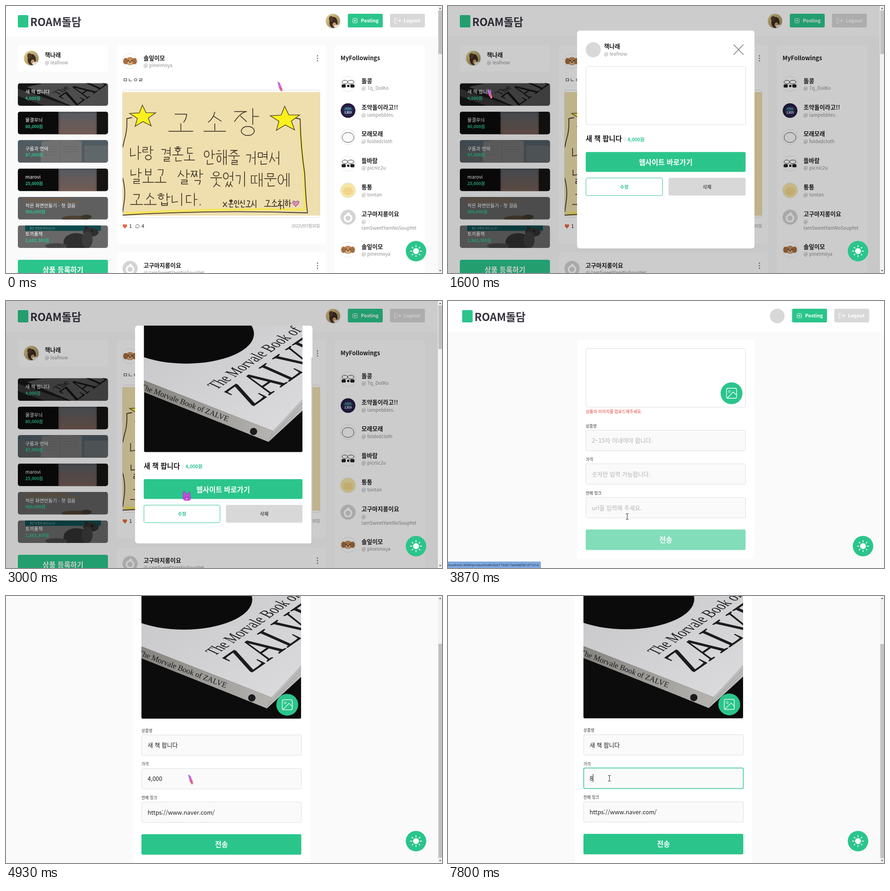
An HTML page that plays this animation: 956x586 px, repeating every 8 s.

```html
<!DOCTYPE html>
<html lang="ko">
<head>
<meta charset="utf-8">
<style>
html, body { margin: 0; width: 100%; height: 100%; overflow: hidden; background: #fafafa; }
svg { display: block; }
text { white-space: pre; }
</style>
</head>
<body>
<svg id="stage" width="956" height="586" viewBox="0 0 956 586"
  font-family="'Noto Sans CJK KR','Noto Sans CJK JP','Noto Sans',sans-serif"></svg>
<script>
const LOOP = 8000;
const GREEN = '#2bc58b', GREY = '#d8d8d8', INK = '#1d1d1f', MUTED = '#8f8f8f', RED = '#e03c31';
const SERIF = "'Liberation Serif',serif";

const text = (x, y, s, size, fill = INK, weight = 400, extra = '') =>
  `<text x="${x}" y="${y}" font-size="${size}" fill="${fill}" font-weight="${weight}" ${extra}>${s}</text>`;
const centred = (x, y, s, size, fill, weight = 700) => text(x, y, s, size, fill, weight, 'text-anchor="middle"');
const rect = (x, y, w, h, fill, r = 0, extra = '') =>
  `<rect x="${x}" y="${y}" width="${w}" height="${h}" rx="${r}" fill="${fill}" ${extra}/>`;
const circle = (x, y, r, fill, extra = '') => `<circle cx="${x}" cy="${y}" r="${r}" fill="${fill}" ${extra}/>`;
const ellipse = (x, y, rx, ry, fill, extra = '') =>
  `<ellipse cx="${x}" cy="${y}" rx="${rx}" ry="${ry}" fill="${fill}" ${extra}/>`;
const path = (d, fill = 'none', stroke = 'none', width = 1) =>
  `<path d="${d}" fill="${fill}" stroke="${stroke}" stroke-width="${width}" stroke-linecap="round" stroke-linejoin="round"/>`;
const at = (x, y, body, extra = '') => `<g transform="translate(${x} ${y})" ${extra}>${body}</g>`;
const group = (id, body, extra = '') => `<g id="${id}" ${extra}>${body}</g>`;
const outline = colour => `stroke="${colour}"`;

const defs = `<defs>
  <linearGradient id="sky" x2="0" y2="1"><stop stop-color="#4b5158"/><stop offset="1" stop-color="#6b5148"/></linearGradient>
  <linearGradient id="fur" x2="1" y2="1"><stop stop-color="#e3d58e"/><stop offset=".5" stop-color="#b9a46c"/><stop offset="1" stop-color="#8c8f5c"/></linearGradient>
  <linearGradient id="cover" x2="1" y2="1"><stop stop-color="#c6c6c9"/><stop offset="1" stop-color="#dcdcde"/></linearGradient>
  <linearGradient id="spine"><stop stop-color="#85847f"/><stop offset="1" stop-color="#b5b4b1"/></linearGradient>
  <radialGradient id="night"><stop stop-color="#2a5673"/><stop offset=".6" stop-color="#2c2150"/><stop offset="1" stop-color="#1b1430"/></radialGradient>
  <linearGradient id="pen" x2="0" y2="1"><stop stop-color="#a65cf0"/><stop offset=".55" stop-color="#dd62d8"/><stop offset="1" stop-color="#f0586a"/></linearGradient>
  <clipPath id="cardClip"><rect width="197.5" height="49.5" rx="5"/></clipPath>
  <clipPath id="faceClip"><circle r="16.2"/></clipPath>
  <clipPath id="photoClip"><rect width="350" height="283.5" rx="3"/></clipPath>
  <clipPath id="letterClip"><rect x="256" y="189" width="432.5" height="271"/></clipPath>
  <clipPath id="modalClip"><rect x="283" y="54" width="389" height="478" rx="6"/></clipPath>
</defs>`;

const faces = {
  me: circle(0, 0, 17, 'url(#fur)') + ellipse(1, 3, 9, 12, '#3b2a20') + ellipse(-4, -5, 5, 6, '#54392a') +
    ellipse(3, 8, 4, 5, '#c59a6c') + ellipse(9, 12, 7, 4, '#e6ded0'),
  puppy: circle(0, 0, 17, '#fff') + ellipse(0, 0, 10, 9, '#c08a58') + ellipse(-10, 0, 5, 7, '#a56d40') +
    ellipse(10, 0, 5, 7, '#a56d40') + ellipse(0, 4, 5, 4, '#d9ae82') + circle(-4, -1, 1.2, '#222') +
    circle(4, -1, 1.2, '#222') + ellipse(0, 2, 1.8, 1.3, '#222'),
  mono: circle(0, 0, 17, '#fff') + ellipse(-7, -4, 6, 4, '#fff', outline('#222')) + ellipse(6, -4, 7, 4, '#fff', outline('#222')) +
    rect(-14, 1, 9, 7, '#222', 2) + rect(-2, 2, 5, 5, '#222', 1) + rect(5, 1, 9, 7, '#222', 2),
  night: circle(0, 0, 17, 'url(#night)') + centred(0, 6, '2,819', 6, '#fff') + rect(-7, -6, 14, 1.5, '#58b4a8') + rect(-9, -3, 18, 1.2, '#4a8f9c'),
  pale: circle(0, 0, 17, '#fff') + ellipse(0, 1, 13, 11, '#fcfcfc', outline('#444')),
  cream: circle(0, 0, 17, '#f5e6a6') + ellipse(0, 2, 11, 9, '#f3d58a'),
  blank: circle(0, 0, 17, '#d3d3d3') + circle(0, 2, 7.5, 'none', 'stroke="#fff" stroke-width="4"') + ellipse(1, -8, 3, 2.5, '#fff'),
};
const avatar = (x, y, kind, r = 16.5) =>
  at(x, y, `<g clip-path="url(#faceClip)">${faces[kind]}</g>` + circle(0, 0, r, 'none', outline('#e3e3e3')));
const person = (x, y, kind, name, handle, dx = 29.5) =>
  avatar(x, y, kind) + text(x + dx, y - 2.5, name, 12.8, INK, 700) + text(x + dx, y + 13, handle, 10.3, MUTED);

const header = rect(-10, 0, 980, 67, '#fff') + rect(26, 20, 23, 27, GREEN, 2) +
  text(53, 44, 'ROAM돌담', 23.5, '#34343f', 900) +
  circle(717, 33, 16, GREY) + group('headerFace', avatar(717, 33, 'me', 16)) +
  rect(749.5, 17, 76.5, 30, GREEN, 3) + rect(760.5, 27.5, 9.5, 9.5, 'none', 2, outline('#fff')) +
  path('M765.2 30v4.6M763 32.3h4.6', 'none', '#fff') + text(778, 36, 'Posting', 10.6, '#fff', 700) +
  rect(842, 17, 76.5, 30, GREY, 3) +
  path('M857 27h-4.5v10.5h4.5M857 32.2h8M862.5 29.5l2.8 2.7l-2.8 2.7', 'none', '#fff', 1.2) +
  text(872, 36, 'Logout', 10.6, '#fff', 700);

const blueBook = rect(0, 0, 198, 50, '#0b0b0b') + rect(89, 0, 84, 50, 'url(#sky)') + rect(93, 4, 77, 46, '#fff', 0, 'opacity=".06"') + rect(173, 0, 25, 50, '#161412');
const books = [
  ['새 책 팝니다', '4,000원', rect(0, 0, 198, 50, '#161616') + path('M58 0H198V50H118L20 8Z', '#4d4d4d') +
    path('M0 12L112 50H60L0 28Z', '#353535') +
    `<text transform="matrix(.84 -.54 .9 .43 88 27)" font-size="20" font-family="${SERIF}" fill="#111">The</text>` +
    `<text transform="matrix(.82 -.57 1.44 .64 128 50)" font-size="44" font-family="${SERIF}" fill="#111">ZALVE</text>`],
  ['물결무늬', '80,000원', blueBook],
  ['구름과 언덕', '87,000원', rect(0, 0, 198, 50, '#555b5e') + rect(0, 0, 198, 14, '#4f5a61') + path('M52 3L92 0L140 2V50H50Z', '#717171') +
    path('M92 2V50M58 14h28M58 20h28M58 26h28M58 32h28M98 14h34M98 20h34M98 26h34', 'none', '#646464') + rect(146, 12, 52, 38, '#60676a')],
  ['marovi', '25,000원', blueBook],
  ['작은 화면만들기 - 첫 걸음', '900,000원', rect(0, 0, 198, 50, '#5f5f5f') + text(16, 8, '화면만들기의 기본 개념과 동작 원리', 6.2, '#9a5a1e') +
    rect(16, 11, 122, 1, '#8a6238') + ellipse(126, 47, 30, 6, '#4b4030') + ellipse(150, 44, 12, 5, '#3c3529')],
  ['토끼풀책', '1,882,300원', rect(0, 0, 198, 50, '#686868') + rect(16, 0, 166, 12, '#0d4a4c') + text(26, 8, '풀은 이렇게 자라나는가?', 5.5, '#8fa5a5') +
    ellipse(128, 37, 28, 20, '#2f2f2f') + ellipse(160, 15, 17, 10, '#303030') + ellipse(152, 32, 12, 18, '#3c3c3c') +
    circle(150, 6, 4, '#2a2a2a') + circle(163, 12, 1.8, '#0a0a0a') + ellipse(84, 45, 24, 6, '#444')],
];
const bookCard = ([title, price, art], i) => at(26, 169.5 + i * 62.4,
  `<g clip-path="url(#cardClip)">${art}</g>` + text(16.5, 22.5, title, 10.3, '#fff') + text(16.5, 36, price, 9.1, GREEN, 700));

const star = (cx, cy, r) => {
  const points = Array.from({ length: 10 }, (_, i) => {
    const a = i * Math.PI / 5 - 1.6, d = i % 2 ? r * .42 : r;
    return `${(cx + d * Math.cos(a)).toFixed(1)},${(cy + d * .85 * Math.sin(a)).toFixed(1)}`;
  });
  return `<polygon points="${points.join(' ')}" fill="#fbf01c" stroke="#55482a" stroke-width="1.5"/>`;
};

// Pen-drawn Hangul: each letter is a stroke in a 10 x 10 box, combined by syllable.
const BROWN = '#41352a';
const INITIALS = 'ㄱㄲㄴㄷㄸㄹㅁㅂㅃㅅㅆㅇㅈㅉㅊㅋㅌㅍㅎ';
const VOWELS = 'ㅏㅐㅑㅒㅓㅔㅕㅖㅗㅘㅙㅚㅛㅜㅝㅞㅟㅠㅡㅢㅣ';
const FINALS = ' ㄱㄲㄳㄴㄵㄶㄷㄹㄺㄻㄼㄽㄾㄿㅀㅁㅂㅄㅅㅆㅇㅈㅊㅋㅌㅍㅎ';
const STROKES = {
  ㄱ: 'M1 2H9Q9 6 7 10', ㄴ: 'M1 1V9L10 8', ㄷ: 'M9 1H2V9H10', ㄸ: 'M4 1H0V9H4M10 1H6V9H10', ㄹ: 'M1 1H9V5H1V9H10',
  ㅁ: 'M1 1H9V9H1Z', ㅂ: 'M1 1V9H9V1M1 5H9', ㅅ: 'M5 0Q4 6 0 10M4 4L10 9', ㅆ: 'M3 0L0 10M2 4L5 10M8 0L5 10M7 4L10 10',
  ㅇ: 'M5 0A4.5 5 0 1 0 5.1 0', ㅈ: 'M0 1H10Q5 2 0 10M5 5L10 10', ㅉ: 'M0 1H4L0 10M3 5L5 10M6 1H10L6 10M9 5L10 10',
  ㅊ: 'M4 -1H6M0 2H10Q5 3 0 10M5 6L10 10', ㅎ: 'M3 -1H7M0 2H10M5 4A3.5 3 0 1 0 5.1 4',
  ㅏ: 'M4 0V10M4 5H10', ㅐ: 'M2 0V10M8 0V10M2 5H8', ㅓ: 'M7 0V10M0 5H7', ㅔ: 'M4 0V10M9 0V10M-2 5H4', ㅕ: 'M7 0V10M-1 4H7M-1 7H7',
  ㅣ: 'M6 0V10', ㅟ: 'M-15 8H3M-6 8V13M7 0V12', ㅗ: 'M5 0V7M0 8H10', ㅜ: 'M0 3H10M5 3V10', x: 'M1 3L8 9M8 3L1 9', '.': 'M1 9V9.5',
};
const pen = (letter, x, y, w, h) =>
  `<path transform="translate(${x} ${y}) scale(${w / 10} ${h / 10})" d="${STROKES[letter]}" vector-effect="non-scaling-stroke"/>`;
function syllable(ch) {
  const code = ch.charCodeAt(0) - 0xAC00;
  if (code < 0) return pen(ch, 0, 0, 10, 10);
  const vowel = VOWELS[Math.floor(code % 588 / 28)], final = FINALS[code % 28].trim();
  const initial = INITIALS[Math.floor(code / 588)], h = final ? 6 : 10;
  const top = 'ㅗㅜ'.includes(vowel)
    ? pen(initial, 2, 0, 6, h * .48) + pen(vowel, 0, h * .55, 10, h * .45)
    : pen(initial, 0, h * .12, 5, h * .7) + pen(vowel, 6, 0, 4, h);
  return top + (final && pen(final, 2.5, 6.8, 6, 3.4));
}
const handwriting = ([x, y, pitch, h, s]) => [...s].map((ch, i) =>
  `<g transform="translate(${x + i * pitch} ${y}) scale(${pitch * .088} ${h / 10})">${syllable(ch)}</g>`).join('');
const notes = [
  [357, 233, 60, 46, '고'], [434, 233, 54, 46, '소'], [501, 225, 60, 58, '장'],
  [272, 307, 27, 30, '나랑'], [340, 310, 25.5, 31, '결혼도'], [434, 316, 27, 32, '안해줄'], [526, 319, 26, 29, '거면서'],
  [273, 356, 27, 34, '날보고'], [377, 359, 29, 32, '살짝'], [449, 364, 27, 32, '웃었기'], [538, 367, 29, 29, '때문에'],
  [273, 411, 30, 27, '고소합니다.'], [475, 426, 12.7, 16, 'x혼인신고시'], [567, 425, 15, 16, '고소취하'],
];
const letter = `<g clip-path="url(#letterClip)">` + rect(256, 189, 433, 271, '#efdfae') +
  path('M262 455Q450 444 655 447Q655 350 643 262', 'none', '#f4e55c', 5) +
  path('M276 245L265 247Q266 275 260 292L256 310M256 378Q263 405 259 430L256 452M634 246L645 248Q646 310 655 368Q657 420 661 454Q450 447 256 459', 'none', BROWN, 1.8) +
  star(300, 243, 30) + star(612, 249, 34) +
  `<g fill="none" stroke="${BROWN}" stroke-width="1.7" stroke-linecap="round" stroke-linejoin="round">${notes.map(handwriting).join('')}</g>` +
  path('M635 440Q625 432 630 428Q634 427 635 431Q638 426 642 429Q644 434 635 440Z', '#dc8fc0', '#71405f') + '</g>';

const dots = y => [-5.5, 0, 5.5].map(d => circle(683, y + d, 1.4, '#777')).join('');
const post = rect(243, 85, 458.5, 436.5, '#fff', 5) + person(272, 121, 'puppy', '솔잎이모', '@ pineimoya') + dots(115) +
  text(256, 167, 'ㅁㄴㅇㄹ', 12.2) + rect(255.5, 184.5, 433, 279.5, '#fff', 5, outline('#dcdcdc')) + letter +
  path('M260.8 488.5L256.5 484Q255 480 258 478.8Q260 478.5 260.8 480.5Q261.8 478.5 264 479Q266.5 480.5 264.8 484Z', '#e8663c') +
  text(270, 487, '1', 11) + path('M288.5 479.5a4 3.8 0 1 1 -2 7.1l-2 .8l.6-2a4 3.8 0 0 1 3.4-5.9Z', 'none', '#555') +
  text(297, 487, '4', 11) + text(688.5, 485.5, '2022년07월30일', 8.7, MUTED, 400, 'text-anchor="end"');
const nextPost = rect(243, 541, 458.5, 60, '#fff', 5) + person(272, 576, 'blank', '고구마지롱이요', '@ IamSweetYamNoSoupYet') + dots(570);

const friends = [
  [171, 'mono', '돌콩', '@ 7q_DolKo'], [229.5, 'night', '조약돌이라고!!', '@ iampebbles.'],
  [287.5, 'pale', '모래모래', '@ foldedcloth'], [346, 'mono', '들바람', '@ picnic2u'],
  [404.5, 'cream', '통통', '@ tontan'], [463.5, 'blank', '고구마지롱이요', '@'], [535, 'puppy', '솔잎이모', '@ pineimoya'],
];
const home = rect(26, 85, 197.5, 59, '#fff', 5) + person(55.5, 114.5, 'me', '책나래', '@ leafnow') +
  books.map(bookCard).join('') + rect(26, 557, 197.5, 45, GREEN, 4) + centred(125, 584.5, '상품 등록하기', 15.4, '#fff') +
  post + nextPost + rect(721, 85, 197.5, 520, '#fff', 5) + text(733.5, 118.5, 'MyFollowings', 12.8, INK, 700) +
  friends.map(([y, ...who]) => person(750, y, ...who)).join('') + text(779.5, 490.5, 'IamSweetYamNoSoupYet', 10.3, MUTED);

const photo = `<g clip-path="url(#photoClip)">` + rect(0, 0, 350, 284, '#0c0c0d') +
  path('M0 0H350V168L285 237L0 125Z', 'url(#cover)') + path('M285 237L350 166V192L275 261Z', '#bcbcbc') +
  path('M282 247L350 176M279 253L350 184', 'none', '#8d8d8d') +
  path('M0 125L285 237L275 261L0 151Z', 'url(#spine)') + ellipse(93, 22, 150, 66, '#0b0b0c') +
  `<g font-family="${SERIF}" fill="#1b1b1d">` +
  `<text transform="matrix(.82 -.57 1.3 .6 161 146)" font-size="26.5">The Morvale Book of</text>` +
  `<text transform="matrix(.82 -.57 1.44 .64 240 184)" font-size="72">ZALVE</text>` +
  `<text transform="translate(-8 143) rotate(20.8)" font-size="17">The Morvale Book of ZALVE</text></g>` +
  circle(242, 238, 8, '#1b1b1d') + '</g>';

function modal(loaded) {
  const w = loaded ? 348 : 350.5, half = (w - 12.5) / 2, dy = loaded ? 152.5 : 0, right = 302 + half + 12.5;
  return (loaded ? avatar(318.5, 96, 'me') : circle(318.5, 96, 16.5, GREY)) +
    text(342, 93, '책나래', 12.8, INK, 700) + text(342, 108.5, '@ leafnow', 10.3, MUTED) +
    path('M626.5 85L647.5 106.5M647.5 85L626.5 106.5', 'none', '#777', 1.5) +
    (loaded ? at(302.5, 132, `<g transform="scale(.993)">${photo}</g>`) : rect(302.5, 132.5, 350, 128, '#fff', 3, outline('#dedede'))) +
    at(0, dy, text(302, 297, '새 책 팝니다', 15.4, INK, 700) + rect(387.5, 288, 1, 9, '#ccc') +
      text(393.5, 296.5, '4,000원', 10.3, GREEN, 700) +
      rect(302, 320.5, w, 43.5, GREEN, 3) + centred(302 + w / 2, 349, '웹사이트 바로가기', 15.4, '#fff') +
      rect(302.5, 377.5, half - 1, 38.5, '#fff', 3, outline(GREEN)) + centred(302 + half / 2, 400.5, '수정', 10.3, GREEN) +
      rect(right, 377, half, 39, GREY, 3) + centred(right + half / 2, 400.5, '삭제', 10.3, '#555'));
}

const field = (y, label, body, id = '') => text(302, y - 6, label, 8.7, '#777', 700) +
  rect(302.5, y, 350, 45, '#fafafa', 3, `${outline('#dedede')} ${id && `id="${id}"`}`) + body;
const hint = (y, s, extra) => text(315.5, y + 27.5, s, 12.8, '#b3b3b3', 400, extra);
const value = (y, s, extra) => text(315.5, y + 27.5, s, 12.8, INK, 400, extra);
const NUMBERS_ONLY = '숫자만 입력 가능합니다.';

function editForm(loaded) {
  const bottom = loaded ? 388 : 233, base = bottom + (loaded ? 0 : 15);
  const [nameY, priceY, linkY, sendY] = [35.8, 109.2, 183, 253.5].map(d => base + d);
  const price = loaded
    ? hint(priceY, NUMBERS_ONLY, 'id="priceHint"') + value(priceY, '', 'id="price"') +
      rect(0, priceY + 13, 1, 18, '#111', 0, 'id="caret"') +
      text(302, priceY + 57.5, '가격을 입력해주세요.', 9, RED, 400, 'id="priceError"')
    : hint(priceY, NUMBERS_ONLY);
  const lower = field(linkY, '판매 링크', loaded ? value(linkY, 'https://www.naver.com/') : hint(linkY, 'url을 입력해 주세요.')) +
    rect(302, sendY, 350.5, 45, GREEN, 3, loaded ? 'id="send"' : 'opacity=".59"') + centred(477.5, sendY + 28.5, '전송', 15.4, '#fff');
  return rect(283, 85, 389, loaded ? 640 : 481, '#fff', 4) +
    (loaded ? at(302, 104.5, photo) : rect(302.5, 104.5, 350, 128.5, '#fff', 3, outline('#dedede')) +
      text(302, 245.8, '상품의 이미지를 업로드해주세요.', 9, RED)) +
    at(621.7, bottom - 30.5, circle(0, 0, 24, GREEN) + rect(-11, -11, 22, 22, 'none', 3, 'stroke="#fff" stroke-width="1.3"') +
      circle(-4.5, -4, 2.2, 'none', outline('#fff')) + path('M-9 10L4 -3L11 4', 'none', '#fff', 1.3)) +
    field(nameY, '상품명', loaded ? value(nameY, '새 책 팝니다') : hint(nameY, '2~15자 이내여야 합니다.')) +
    field(priceY, '가격', price, loaded ? 'priceBox' : '') + (loaded ? group('lower', lower) : lower);
}

const rays = Array.from({ length: 8 }, (_, i) => `<path d="M0 -9.5V-12" transform="rotate(${i * 45})" stroke="#fff" stroke-width="1.8" stroke-linecap="round"/>`).join('');
const sun = circle(0, 0, 22.5, GREEN) + circle(0, 0, 6.5, '#fff') + rays;
const scrollbar = rect(947, 0, 9, 586, '#f1f1f1') + path('M949.5 6.5h5l-2.5-3ZM949.5 579.5h5l-2.5 3Z', '#505050') + rect(948, 10, 8, 96, '#c1c1c1', 0, 'id="thumb"');
const cursors = {
  arrow: path('M0 0L4 3L8 12L10 20L7 21L3 14Z', 'url(#pen)', '#b860cc', .6) + path('M4 15l4-2l2 5l-2 3Z', '#f7a0b0', '#d03a50', .7) + circle(7, 16, 1.2, '#c8203c'),
  hand: path('M-3 2L0 0L4 7H6L11 2L12.5 3L12 10Q16 18 11 20.5H1Q-5 18 -2 10Z', '#c94be0', '#8c2aa8', .8) +
    circle(2, 14, 1, '#5a1470') + circle(8.5, 14, 1, '#5a1470') + ellipse(5.3, 17, 2.2, 1.2, '#f29be8'),
  beam: path('M-2.5 -6.5Q0 -6.5 0 -5Q0 -6.5 2.5 -6.5M0 -5V5M-2.5 6.5Q0 6.5 0 5Q0 6.5 2.5 6.5', 'none', '#222', 1),
};

document.getElementById('stage').innerHTML = defs + rect(0, 0, 956, 586, '#fafafa') +
  group('page', header + group('home', home) + at(-5, 0, group('editEmpty', editForm(false)) + group('editFull', editForm(true)))) +
  group('popup', rect(0, 0, 947, 586, '#000', 0, 'opacity=".2"') + rect(283, 54, 389, 478, '#fff', 6) +
    `<g clip-path="url(#modalClip)">` + group('modalEmpty', modal(false)) + group('modalFull', modal(true)) +
    rect(669.5, 54, 3, 408, '#c8c8c8', 0, 'id="modalThumb"') + '</g>') +
  group('sun', sun) + group('scrollbar', scrollbar) +
  group('status', rect(-2, 572.5, 205, 15, '#7fa9e0', 2, outline('#6d93c6')) +
    text(0, 582.3, 'localhost:3000/product/edit/62e719c817ae666581471a14', 7.4, '#1c2a3c', 400, `font-family="'Open Sans',sans-serif"`)) +
  Object.entries(cursors).map(([id, art]) => group(id, art)).join('');

const el = Object.fromEntries([...document.querySelectorAll('#stage [id]')].map(node => [node.id, node]));
const show = (id, on) => el[id].setAttribute('display', on ? 'inline' : 'none');
const move = (id, x, y) => el[id].setAttribute('transform', `translate(${x} ${y})`);
const ease = (t, from, to) => {
  const p = Math.min(1, Math.max(0, (t - from) / (to - from)));
  return p * p * (3 - 2 * p);
};
const latest = (keys, t) => keys.reduce((found, key) => key[0] <= t ? key : found);

const pointerKeys = [
  [0, 596, 166, 'arrow'], [70, 596, 166, 'arrow'], [200, 330, 188, 'arrow'], [280, 150, 196, 'hand'], [330, 87, 182, 'hand'],
  [1600, 87, 182, 'arrow'], [2200, 87, 182, 'arrow'], [2600, 350, 335, 'arrow'], [2800, 386, 400, 'hand'], [2950, 391, 417, 'hand'],
  [3070, 391, 417, 'hand'], [3400, 393, 473, 'hand'], [3800, 393, 473, 'beam'], [4070, 393, 473, 'arrow'], [4700, 400, 392, 'arrow'],
  [4990, 400, 392, 'beam'], [5400, 354, 400, 'beam'], [LOOP, 354, 400, 'beam'],
];
const priceKeys = [[0, '4,000'], [6200, '400'], [6400, '40'], [6470, '4'], [6600, ''], [7800, '8']];
const caretKeys = [[0, false], [5470, true], [6000, false], [6200, true], [7270, false], [7800, true]];

function drawPointer(t) {
  const from = latest(pointerKeys, t), to = pointerKeys[pointerKeys.indexOf(from) + 1];
  const p = (t - from[0]) / (to[0] - from[0]);
  const mix = i => from[i] + (to[i] - from[i]) * p;
  for (const kind in cursors) show(kind, kind === from[3]);
  move(from[3], mix(1), mix(2));
}

function drawPrice(t) {
  const price = latest(priceKeys, t)[1], empty = price === '', focused = t >= 5470;
  el.price.textContent = price;
  show('priceHint', empty);
  show('priceError', empty);
  show('caret', latest(caretKeys, t)[1]);
  el.caret.setAttribute('x', 315.5 + (empty ? 0 : el.price.getComputedTextLength()));
  el.priceBox.setAttribute('stroke', focused ? GREEN : '#dedede');
  el.priceBox.setAttribute('stroke-width', focused ? 1.5 : 1);
  el.send.setAttribute('opacity', empty ? .59 : 1);
  move('lower', 0, empty ? 15 : 0);
  return empty;
}

function update(t) {
  const editing = t >= 3800, filled = t >= 4070, loaded = t >= 1800;
  const bar = !editing || filled;
  const scroll = 119.6 * ease(t, 4788, 4938), modalScroll = 82 * ease(t, 2600, 2800);

  show('home', !editing);
  show('editEmpty', editing && !filled);
  show('editFull', filled);
  show('headerFace', bar);
  move('page', bar ? 0 : 5, -scroll);

  show('popup', t >= 1600 && !editing);
  show('modalEmpty', !loaded);
  show('modalFull', loaded);
  show('modalThumb', loaded);
  move('modalFull', 0, -modalScroll);
  el.modalThumb.setAttribute('y', 54 + modalScroll / 560 * 478);

  const longer = drawPrice(t) ? 15 : 0;
  const pageHeight = filled ? 706 + longer : 3455;
  show('scrollbar', bar);
  el.thumb.setAttribute('y', 9.5 + scroll / pageHeight * 566);
  el.thumb.setAttribute('height', 586 / pageHeight * 566);
  move('sun', bar ? 899 : 910, 538);
  show('status', t >= 3300 && t < 4270);
  drawPointer(t);
}

const start = performance.now();
function frame() {
  update((performance.now() - start) % LOOP);
  requestAnimationFrame(frame);
}
frame();
</script>
</body>
</html>
```
